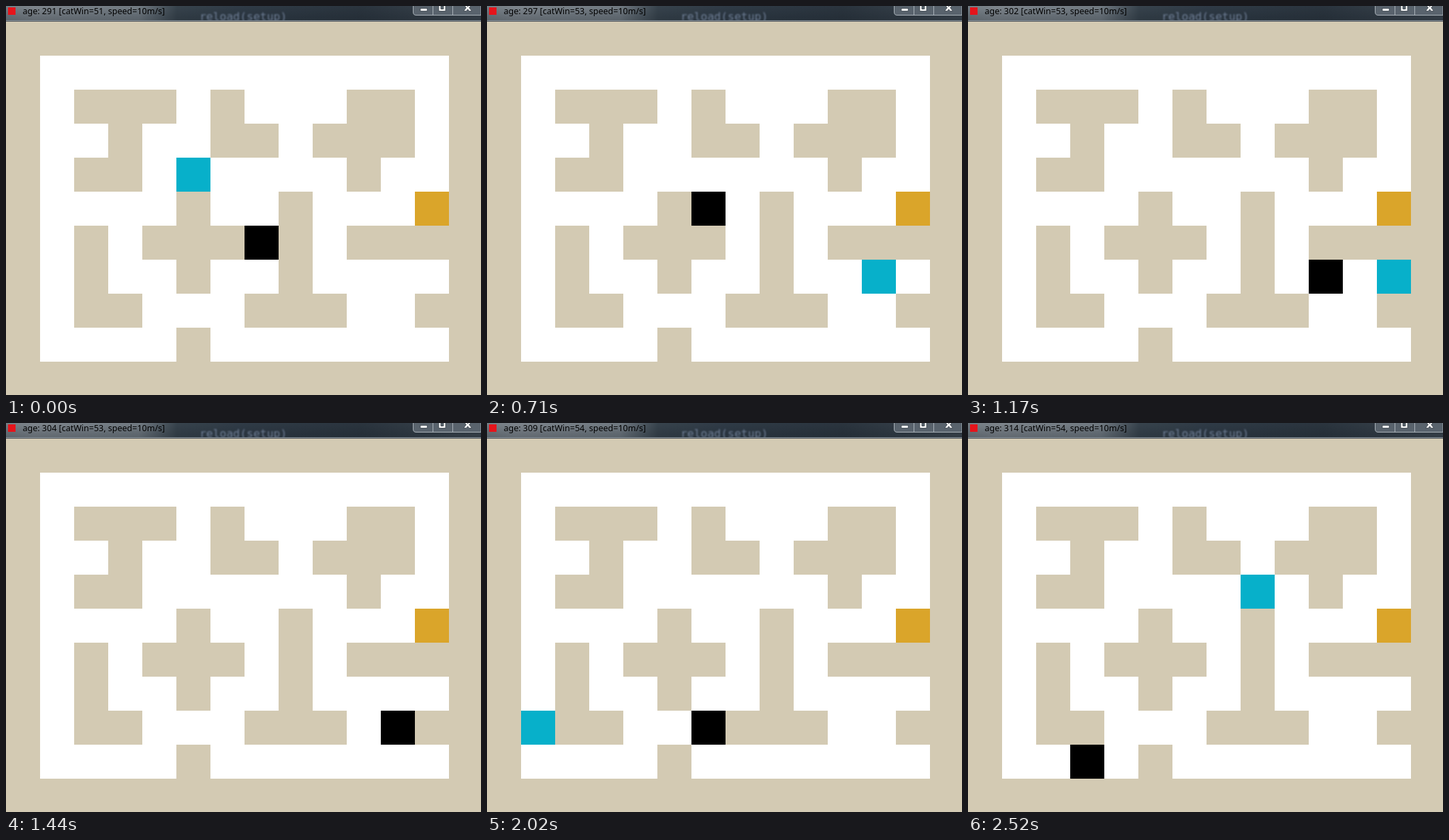
Animation of 697 by 572 pixels, one loop 2620 ms. Source, as an HTML page:

```html
<!DOCTYPE html>
<html lang="en">
<head>
<meta charset="utf-8">
<title>Cat and mouse maze</title>
<style>
  html, body { margin: 0; width: 100%; height: 100%; overflow: hidden; background: #d3cab3; }
  svg { display: block; }
  text { white-space: pre; }
</style>
</head>
<body>
<svg width="697" height="572" viewBox="0 0 697 572">
  <defs>
    <linearGradient id="glass">
      <stop offset="0" stop-color="#7f8990"/>
      <stop offset=".06" stop-color="#8b9299"/>
      <stop offset=".28" stop-color="#7d868e"/>
      <stop offset=".36" stop-color="#3c4852"/>
      <stop offset=".5" stop-color="#333f4b"/>
      <stop offset=".75" stop-color="#2e3842"/>
      <stop offset="1" stop-color="#414b55"/>
    </linearGradient>
    <linearGradient id="shade" x2="0" y2="1">
      <stop offset="0" stop-color="#10181f" stop-opacity=".1"/>
      <stop offset="1" stop-color="#10181f" stop-opacity=".35"/>
    </linearGradient>
    <filter id="blur"><feGaussianBlur stdDeviation="1.3"/></filter>
    <clipPath id="bar"><rect width="697" height="21"/></clipPath>
  </defs>

  <g clip-path="url(#bar)">
    <rect width="697" height="22" fill="url(#glass)"/>
    <rect width="697" height="22" fill="url(#shade)"/>
    <text x="284" y="21" font-family="'DejaVu Sans Mono', monospace" font-size="16.4"
          fill="#9db0d0" opacity=".6" filter="url(#blur)">reload(setup)</text>
    <g fill="#59636d" stroke="#a9b1b8">
      <path d="M597.5 -2V9Q597.5 13.5 602 13.5H697V-2Z"/>
      <path d="M626.5 0V13M655.5 0V13"/>
    </g>
    <g fill="#fff" stroke="#39424b" stroke-width=".8">
      <rect x="608" y="3.5" width="10" height="4"/>
      <path fill-rule="evenodd" d="M635 -3H645V7.5H635ZM638 0V4.5H642V0Z"/>
      <path d="M671.5 -2H675L677.5 1L680 -2H683.5L679.7 2.5L683.5 7.5H679.7L677.5 4.8L675.3 7.5H671.5L675.3 2.5Z"/>
    </g>
  </g>
  <path d="M0 21.5H697" stroke="#8d979e"/>
  <path d="M0 22.5H697" stroke="#4c525a"/>
  <rect x="3" y="2" width="11" height="11" fill="#e5141b"/>
  <text id="caption" x="24.5" y="12" font-family="'Noto Sans', sans-serif" font-size="12.5" fill="#000"></text>

  <g shape-rendering="crispEdges">
    <rect y="23" width="697" height="549" fill="#d3cab3"/>
    <path id="floor" fill="#fff"/>
    <rect id="cheese" width="50" height="50" fill="#daa52a"/>
    <rect id="mouse" width="50" height="50" fill="#07b0ca"/>
    <rect id="cat" width="50" height="50" fill="#000"/>
  </g>
</svg>
<script>
const CELL = 50, TOP = 23, LOOP = 2620;
const $ = id => document.getElementById(id);

const maze = [
  '............',
  '.###.#...##.',
  '..#..##.###.',
  '.##......#..',
  '....#..#....',
  '.#.###.#.###',
  '.#..#..#....',
  '.##...###..#',
  '....#.......',
];

// start ms, age, cat wins, cat cell, mouse cell (column and row, base 16)
const steps = [
  [0, 291, 51, '76', '54'],
  [140, 292, 51, '65', '53'],
  [260, 293, 51, '64', '43'],
  [410, 295, 51, '43', '43'],
  [560, 296, 53, '54', 'a7'],
  [710, 297, 53, '65', 'b7'],
  [860, 299, 53, '84', 'b8'],
  [1020, 300, 53, '95', 'c7'],
  [1170, 302, 53, 'a7', 'c7'],
  [1320, 303, 53, 'b7', 'c7'],
  [1440, 304, 53, 'b8', 'b8'],
  [1590, 306, 54, '99', '19'],
  [1740, 307, 54, '89', '18'],
  [1870, 308, 54, '79', '18'],
  [2020, 309, 54, '68', '18'],
  [2160, 310, 54, '48', '29'],
  [2280, 311, 54, '39', '29'],
  [2400, 313, 54, '29', '29'],
  [2520, 314, 54, '39', '84'],
];

function place(id, cell) {
  const [col, row] = [...cell].map(d => parseInt(d, 16));
  $(id).setAttribute('x', col * CELL);
  $(id).setAttribute('y', TOP + row * CELL);
}

$('floor').setAttribute('d', maze.map((line, r) =>
  [...line].map((ch, c) => ch === '.'
    ? `M${(c + 1) * CELL} ${TOP + (r + 1) * CELL}h${CELL}v${CELL}h-${CELL}z` : '').join('')).join(''));
place('cheese', 'c5');

let shown;
function draw(ms) {
  const t = ms % LOOP;
  const step = steps.findLast(s => s[0] <= t);
  if (step === shown) return;
  shown = step;
  const [, age, wins, cat, mouse] = step;
  $('caption').textContent = `age: ${age} [catWin=${wins}, speed=10m/s]`;
  place('mouse', mouse);
  place('cat', cat);
}

const start = performance.now();
function tick() {
  draw(performance.now() - start);
  requestAnimationFrame(tick);
}
tick();
</script>
</body>
</html>
```
